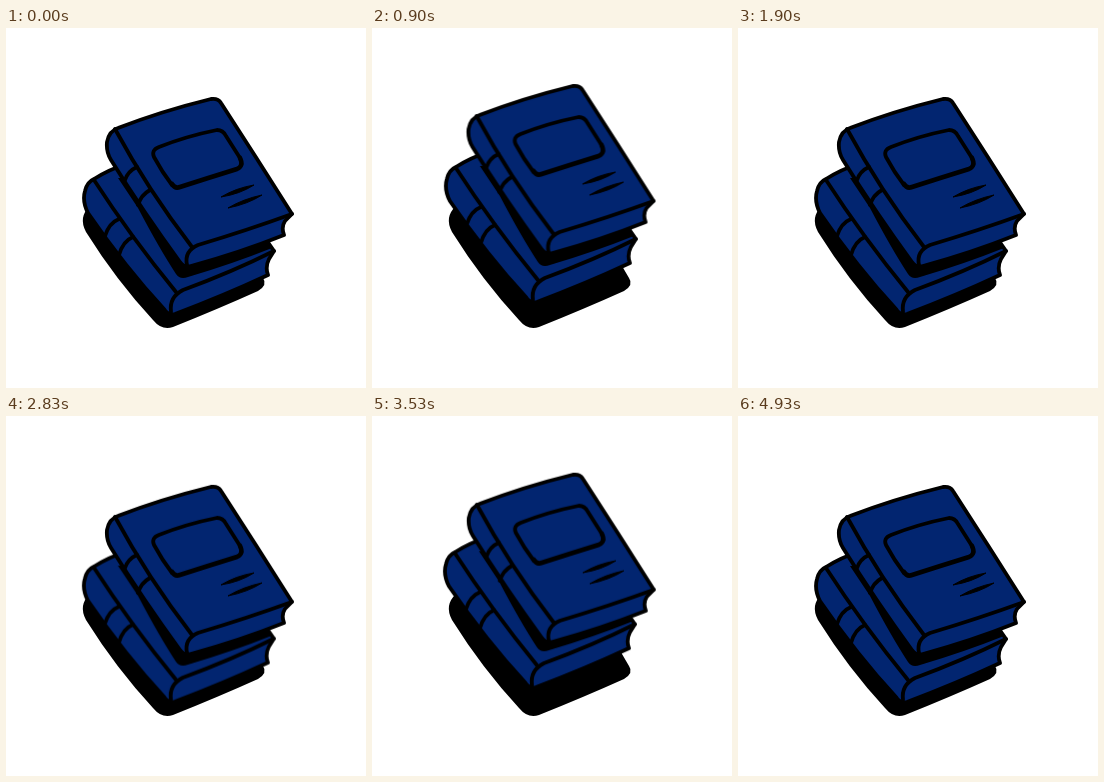
Recreate the animation shown at these times as an HTML page. Size 360 px wide and 360 px high, loop 5000 ms.

```html
<!DOCTYPE html>
<html lang="en">
<head>
<meta charset="utf-8">
<title>Books</title>
<style>
  html, body { margin: 0; width: 100%; height: 100%; overflow: hidden; background: #fff; }
  svg { display: block; width: 100vw; height: 100vh; }
  .ink { fill: none; stroke: #000; stroke-width: 3.8; stroke-linecap: round; stroke-linejoin: round; }
  .cover { fill: #022570; }
  .heavy { stroke-width: 4.6; }
  .book { animation: 5s cubic-bezier(.37, 0, .63, 1) infinite; }
  .lower { animation-name: lower; }
  .upper { animation-name: upper; }
  /* Each book hops twice per loop; the lower one leads. */
  @keyframes lower {
    0%, 30%, 55.4%, 85.4%, 100% { transform: translate(0, 0); }
    12%, 67.4% { transform: translate(-5.5px, -16px); }
  }
  @keyframes upper {
    0%, 34%, 55.4%, 89.4%, 100% { transform: translate(0, 0); }
    18%, 73.4% { transform: translate(-4.5px, -13px); }
  }
</style>
</head>
<body>
<svg viewBox="0 0 360 360">
  <path d="M84 178Q72 189 80 204Q110 252 147 292Q156 303 167 299Q212 281 252 263Q262 257 257 250L250 238L246 225L150 190Z"/>

  <g class="book lower">
    <path class="ink cover" d="M88 151Q81 154 79 163Q76 173 82 185Q119 239 158 281Q162 288 169 286Q217 268 262 247Q259 239 263 231L268 223L200 125L120 136Q102 142 88 151Z"/>
    <!-- shade cast by the book above -->
    <path d="M112 150L132 180Q153 220 170 246Q174 252 182 249Q226 236 266 220L262 210L210 150Z"/>
    <g class="ink">
      <path d="M88 152Q125 209 170 264"/>
      <path d="M165 284Q163 269 177 262Q226 244 268 223"/>
      <path d="M99 208Q103 195 113 191"/>
      <path d="M113 227Q117 213 127 209"/>
    </g>
  </g>

  <g class="book upper">
    <path class="ink cover" d="M112 100Q103 103 101 114Q100 124 105 132Q138 185 174 234Q178 240 185 238Q233 225 278 207Q275 199 279 193L286 186Q250 129 215 75Q212 70 205 71Q156 83 112 100Z"/>
    <g class="ink">
      <path d="M109 101Q142 162 186 219"/>
      <path d="M181 237Q178 223 192 217Q242 202 286 186"/>
      <path d="M119 152Q122 143 131 139"/>
      <path d="M132 177Q135 167 144 162"/>
      <path d="M166 157Q156 144 148 129Q145 122 153 119Q181 108 211 102Q217 102 220 108L234 130"/>
      <path class="heavy" d="M234 130Q238 138 231 141Q202 150 174 159Q169 161 166 156"/>
    </g>
    <path d="M215 169Q230 160 248 157Q234 166 215 169ZM222 180Q237 171 256 167Q242 176 222 180Z" stroke="#000"/>
  </g>
</svg>
</body>
</html>
```
